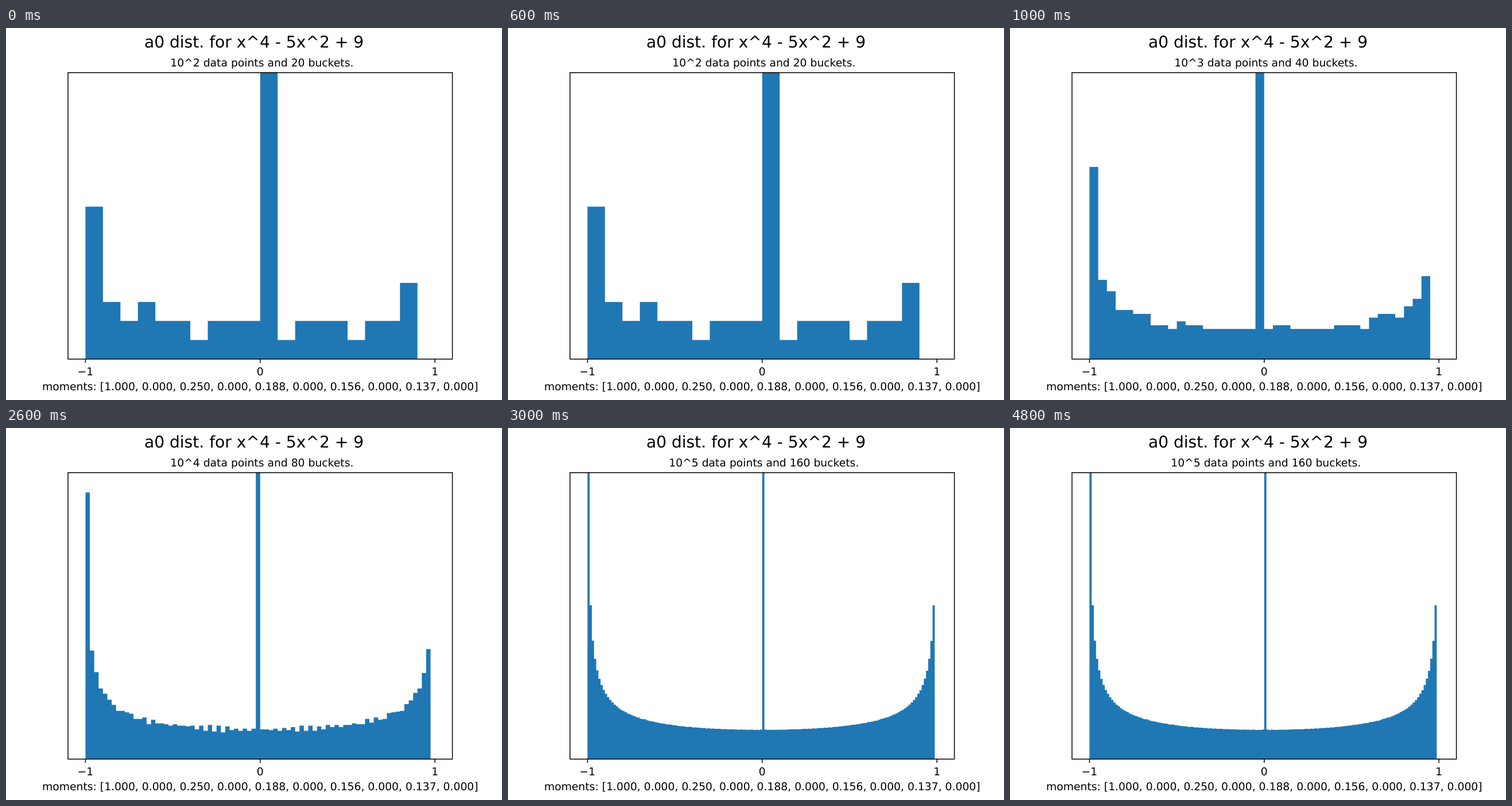
An HTML page with a canvas for the animation above (6 s loop, 864 by 648 pixels).

```html
<!DOCTYPE html>
<html lang="en">
<head>
<meta charset="utf-8">
<title>Histogram</title>
<style>
  html, body { margin: 0; width: 100%; height: 100%; overflow: hidden; background: #fff; }
  canvas { display: block; width: 864px; height: 648px; }
</style>
</head>
<body>
<canvas id="stage" width="864" height="648"></canvas>
<script>
const ctx = document.getElementById('stage').getContext('2d');
const W = 864, H = 648, LOOP = 6000;
const LEFT = 0.125 * W, RIGHT = 0.9 * W, TOP = 0.12 * H, BOTTOM = 0.89 * H;
const MAX_DENSITY = 1.6;

// The x axis spans -1.1 to 1.1.
const toX = v => LEFT + (v + 1.1) / 2.2 * (RIGHT - LEFT);

// Normalised power sums of the roots of x^4 - 5x^2 + 9:
// zero for odd n, cos(n/2 * angle) for even n.
const ANGLE = Math.acos(5 / 6);
const powerSum = n => n % 2 ? 0 : Math.cos(n / 2 * ANGLE);

function histogram(power) {
  const points = 10 ** power, buckets = 5 * 2 ** power;
  // Rounding in the step decides which side of an edge zero falls on.
  const step = (-1 + 2 / buckets) + 1;
  const counts = Array(buckets - 1).fill(0);
  let total = 0;
  for (let n = 1; n <= points; n++) {
    const i = Math.floor((powerSum(n) + 1) / step);
    if (i < counts.length) {
      counts[i]++;
      total++;
    }
  }
  return { power, buckets, step, heights: counts.map(c => c / (total * step)) };
}

const scenes = [2, 3, 4, 5].map(histogram);

function label(text, x, y, size = 18.75) {
  ctx.save();
  // A hair of skew keeps the baseline off the whole-pixel grid.
  ctx.setTransform(1, 1e-4, 0, 1, x, y);
  ctx.font = `${size}px "DejaVu Sans", sans-serif`;
  ctx.fillText(text, 0, 0);
  ctx.restore();
}

function drawBars({ step, heights }) {
  ctx.save();
  ctx.beginPath();
  ctx.rect(LEFT, TOP, RIGHT - LEFT, BOTTOM - TOP);
  ctx.clip();
  ctx.beginPath();
  ctx.moveTo(toX(-1), BOTTOM);
  heights.forEach((h, i) => {
    const y = BOTTOM - h / MAX_DENSITY * (BOTTOM - TOP);
    ctx.lineTo(toX(-1 + i * step), y);
    ctx.lineTo(toX(-1 + (i + 1) * step), y);
  });
  ctx.lineTo(toX(-1 + heights.length * step), BOTTOM);
  ctx.fillStyle = '#1f77b4';
  ctx.fill();
  ctx.restore();
}

function drawAxes() {
  ctx.strokeStyle = ctx.fillStyle = '#000';
  ctx.lineWidth = 1.5;
  ctx.strokeRect(LEFT, TOP, RIGHT - LEFT, BOTTOM - TOP);
  for (const v of [-1, 0, 1]) {
    const x = toX(v);
    ctx.beginPath();
    ctx.moveTo(x, BOTTOM);
    ctx.lineTo(x, BOTTOM + 6.56);
    ctx.stroke();
    label(String(v).replace('-', '\u2212'), x, 604.8);
  }
}

function draw(scene) {
  ctx.fillStyle = '#fff';
  ctx.fillRect(0, 0, W, H);
  drawBars(scene);
  drawAxes();
  label('a0 dist. for x^4 - 5x^2 + 9', W / 2, 34.4, 28.125);
  label(`10^${scene.power} data points and ${scene.buckets} buckets.`, 445.8, 66.8);
  label('moments: [1.000, 0.000, 0.250, 0.000, 0.188, 0.000, 0.156, 0.000, 0.137, 0.000]',
    toX(0), 631.1);
}

ctx.textAlign = 'center';
ctx.textRendering = 'geometricPrecision';
const begin = performance.now();
let shown = null;

// One second per scene; the last one holds to the end of the loop.
function tick() {
  const t = (performance.now() - begin) % LOOP;
  const scene = scenes[Math.min(3, Math.floor(t / 1000))];
  if (scene !== shown) draw(shown = scene);
  requestAnimationFrame(tick);
}
tick();
</script>
</body>
</html>
```
